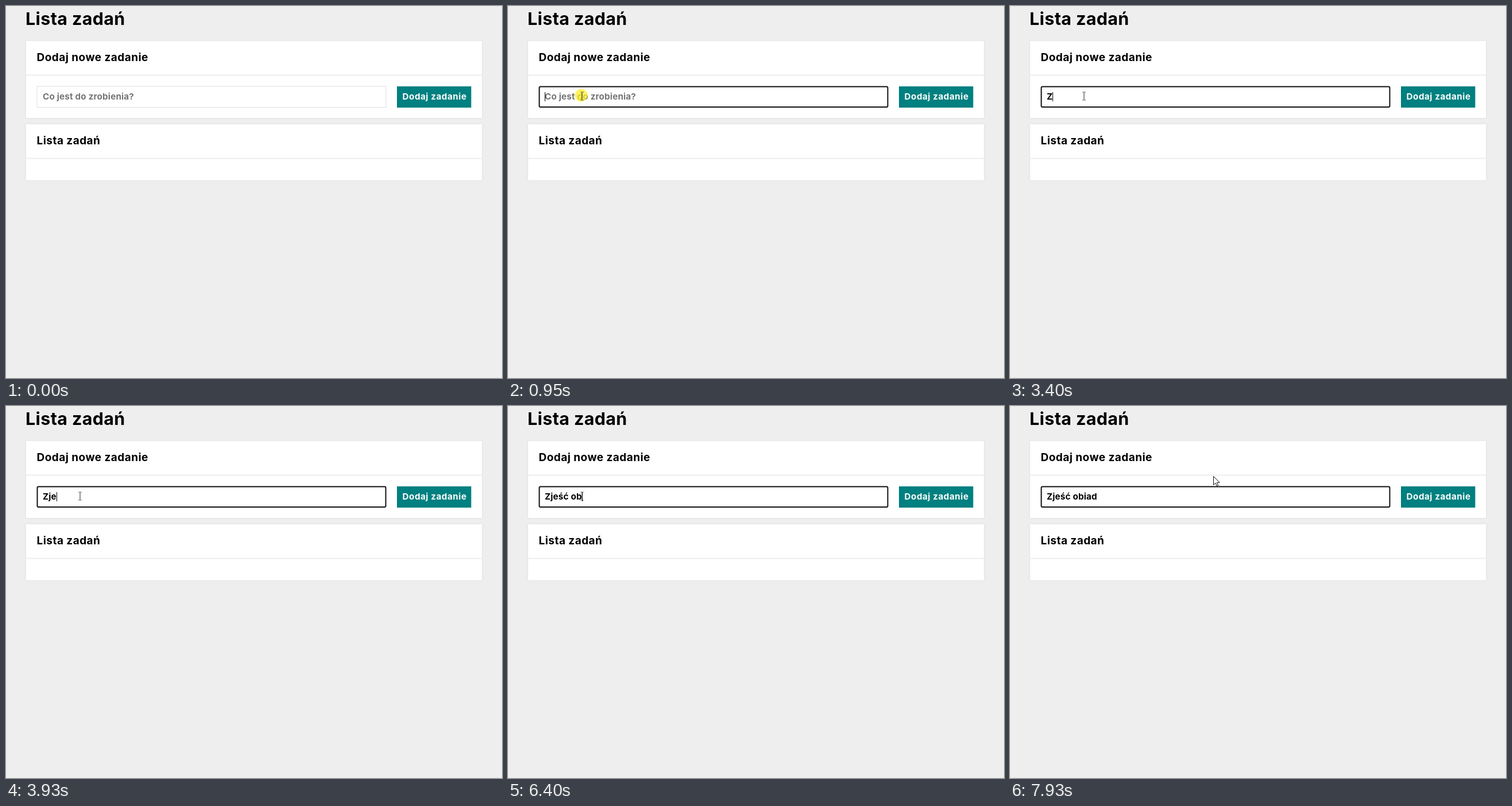
Animation, 864 px wide and 648 px high, one loop 8000 ms. Source, as an HTML page:

```html
<!DOCTYPE html>
<html lang="pl">
<head>
<meta charset="utf-8">
<title>Lista zadań</title>
<style>
html, body { margin: 0; width: 100%; height: 100%; overflow: hidden; background: #eee; }
svg { display: block; width: 864px; height: 648px; }
text { font: 700 15.2px Inter, "Open Sans", sans-serif; letter-spacing: .013em; white-space: pre; }
.h1 { font-size: 30.4px; }
.h2 { font-size: 19px; letter-spacing: .024em; }
.button { fill: #fff; letter-spacing: .036em; }
.panel { fill: #fff; filter: drop-shadow(0 0 1.5px #ddd); }
.line { fill: #eee; }
</style>
</head>
<body>
<svg viewBox="0 0 864 648">
  <text class="h1" x="34" y="32.5">Lista zadań</text>

  <rect class="panel" x="35" y="61" width="794" height="134"/>
  <rect class="line" x="35" y="119.5" width="794" height="2"/>
  <text class="h2" x="53.5" y="96">Dodaj nowe zadanie</text>
  <rect id="box" fill="#fff"/>
  <text id="field" x="64" y="163"></text>
  <rect id="caret" y="150" width="1" height="16"/>
  <rect x="681" y="140" width="129.4" height="37" fill="#008080"/>
  <text class="button" x="690.5" y="163">Dodaj zadanie</text>

  <rect class="panel" x="35" y="206" width="794" height="97.5"/>
  <rect class="line" x="35" y="264.5" width="794" height="2"/>
  <text class="h2" x="53.5" y="241">Lista zadań</text>

  <circle id="click" cx="127.5" cy="155.5" r="11" fill="#fff01e" fill-opacity=".7"/>
  <path id="arrow" d="M.5 .5V15.5L4 12.2 6.4 17.5 8.7 16.5 6.3 11.3H11Z" fill="#fff" stroke="#111"/>
  <path id="beam" d="M-2.5-7H-.5M.5-7H2.5M0-6.5V6.5M-2.5 7H-.5M.5 7H2.5" fill="none" stroke="#222"/>
</svg>
<script>
const LOOP = 8000, FOCUS = 950, BLINK = 530;
const phrase = "Zjeść obiad";
const keyTimes = [3400, 3800, 3930, 4520, 4920, 5650, 6070, 6400, 6670, 6740, 7000];
// pointer positions, one per step
const enter = { start: 190, step: 69, path: [[790, 622], [610, 510], [450, 402], [335, 335],
  [255, 278], [190, 211], [167, 188], [152, 173], [141, 165], [133, 159], [129, 157]] };
const leave = { start: 7800, step: 65, path: [[160, 154], [255, 141], [354, 122]] };

const $ = id => document.getElementById(id);
const set = (el, attrs) => { for (const k in attrs) el.setAttribute(k, attrs[k]); };
const show = (el, on) => set(el, { visibility: on ? "visible" : "hidden" });

function pointerAt(t) {
  if (t < enter.start) return null;
  const { start, step, path } = t < leave.start ? enter : leave;
  return path[Math.min(path.length - 1, Math.floor((t - start) / step))];
}

function drawPointer(t) {
  const p = pointerAt(t);
  const inField = p && p[0] > 54 && p[0] < 662 && p[1] > 140 && p[1] < 177;
  show($("arrow"), p && !inField);
  show($("beam"), inField);
  if (p) set($(inField ? "beam" : "arrow"), { transform: `translate(${p[0]} ${p[1]})` });
  show($("click"), t >= FOCUS && t < 1020);
}

function drawField(t) {
  const focused = t >= FOCUS;
  set($("box"), focused
    ? { x: 54.5, y: 140.5, width: 607, height: 35.5, rx: 2, stroke: "#101010", "stroke-width": 2 }
    : { x: 54, y: 140, width: 608, height: 36.5, rx: 0, stroke: "#ddd", "stroke-width": 1 });

  const typed = keyTimes.filter(k => k <= t).length;
  const field = $("field");
  field.textContent = typed ? phrase.slice(0, typed) : "Co jest do zrobienia?";
  set(field, { fill: typed ? "#000" : "#757575" });

  const edited = typed ? keyTimes[typed - 1] : FOCUS;
  const width = typed ? field.getComputedTextLength() : 0;
  set($("caret"), { x: 64 + Math.round(width) });
  show($("caret"), focused && Math.floor((t - edited) / BLINK) % 2 === 0);
}

function frame() {
  const t = performance.now() % LOOP;
  drawField(t);
  drawPointer(t);
  requestAnimationFrame(frame);
}
frame();
</script>
</body>
</html>
```
